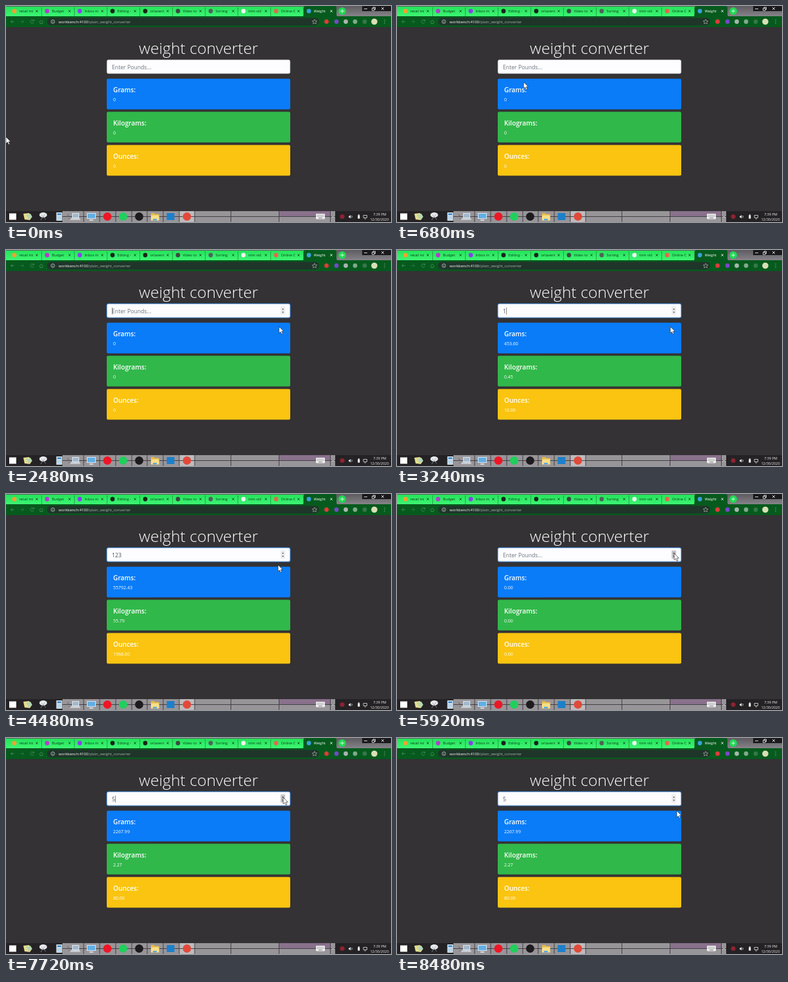
Recreate the animation shown at these times as an HTML page. Size 600 px wide and 338 px high, loop 8.52 s.

```html
<!DOCTYPE html>
<html lang="en">
<head>
<meta charset="utf-8">
<title>Weight converter</title>
<style>
html, body { margin: 0; width: 100%; height: 100%; overflow: hidden; background: #343234; }
svg { display: block; width: 100vw; height: 100vh; font-family: "Open Sans", "Noto Sans", sans-serif; }
text { white-space: pre; }
.title { font-size: 24.7px; font-weight: 300; fill: #fff; text-anchor: middle; }
.head { font-size: 10.2px; font-weight: 600; fill: #fff; }
.value { font-size: 7px; fill: #fff; }
.entry { font-size: 8.7px; fill: #495057; }
.tab { font-size: 5.7px; }
.url { font-size: 5.95px; fill: #a3b5a8; }
.clock { font-size: 5.5px; fill: #f2f2f2; text-anchor: middle; }
.line { fill: none; stroke-width: .8; }
</style>
</head>
<body>
<svg viewBox="0 0 600 338" preserveAspectRatio="none">
  <defs>
    <linearGradient id="frame" x2="0" y2="1">
      <stop offset="0" stop-color="#5d5b60"/><stop offset="1" stop-color="#858388"/>
    </linearGradient>
    <linearGradient id="strip" x2="0" y2="1">
      <stop offset="0" stop-color="#25e35a"/><stop offset="1" stop-color="#3df573"/>
    </linearGradient>
    <clipPath id="clipTab"><rect x="0" y="0" width="25" height="16"/></clipPath>
  </defs>
  <rect width="600" height="338" fill="#343234"/>

  <rect width="600" height="16" fill="url(#frame)"/>
  <rect y="1" width="464" height="15" fill="url(#strip)"/>
  <path d="M462 16q2 0 2-3V3q0-3 3-3h45q3 0 3 3v10q0 3 2 3z" fill="#075a1d"/>
  <g id="tabs"></g>
  <circle cx="524" cy="8" r="6" fill="#22d653"/>
  <path class="line" d="M521 8h6M524 5v6" stroke="#fff"/>
  <rect x="555" width="45" height="8" fill="#1a1a1c"/>
  <path class="line" d="M558 4.500h5M570.500 3.500h3.500v3.500h-3.500zM572 3.500v-1.500h3.500v3.500h-1.500M585 2l4 4M589 2l-4 4" stroke="#fff"/>

  <rect y="16" width="600" height="17" fill="#075a1d"/>
  <rect x="64" y="18.500" width="424" height="12" rx="6" fill="#20352a"/>
  <path class="line" d="M13 24.500H7.500m2.500-2.500l-2.500 2.500 2.500 2.500M43 23a2.700 2.700 0 1 0 .2 2.500M43.500 21v2.300h-2.300M52 25l3-3 3 3M53 24.500v3h4v-3" stroke="#4c8f60"/>
  <path class="line" d="M22 24.500h5.500m-2.500-2.500l2.500 2.500-2.500 2.500" stroke="#33774a"/>
  <circle class="line" cx="73" cy="24.500" r="2.800" stroke="#c5d0c8"/>
  <path class="line" d="M73 24v2M73 22.500v.700" stroke="#c5d0c8"/>
  <text class="url" x="82" y="26.500"><tspan fill="#fff">workbench:4100</tspan>/plain_weight_converter</text>
  <path d="M481 20.800l1.100 2.500 2.700.2-2 1.800.6 2.700-2.400-1.500-2.400 1.500.6-2.700-2-1.800 2.700-.2z" fill="none" stroke="#c5d0c8" stroke-width=".6"/>
  <g id="extras"></g>
  <path d="M589.300 21h1.400v1.400h-1.400zM589.300 23.800h1.400v1.400h-1.400zM589.300 26.600h1.400v1.400h-1.400z" fill="#4c8f60"/>

  <text class="title" x="300" y="75">weight converter</text>
  <rect id="glow" x="156.300" y="83.300" width="287.400" height="23.400" rx="3" fill="#1c5599"/>
  <rect id="box" x="157.300" y="84.300" width="285.400" height="21.400" rx="2.500" fill="#fdfcff" stroke-width=".6"/>
  <text class="entry" id="entry" x="165" y="98.600"></text>
  <rect id="caret" y="90" width=".7" height="11" fill="#555"/>
  <g id="spin">
    <rect id="spinBack" x="428" y="88.500" width="7" height="12.500"/>
    <path d="M430 93.300l1.500-1.800 1.500 1.800zM430 96.700l1.500 1.800 1.500-1.800z" fill="#3c3c3e"/>
  </g>
  <g id="cards"></g>

  <rect y="321" width="600" height="17" fill="#242225"/>
  <rect x="88" y="321" width="425" height="17" fill="#989599"/>
  <rect x="426" y="321" width="79" height="8" fill="#89718b"/>
  <rect x="270" y="321" width="24" height="17" fill="#bdbbbe"/>
  <path d="M88 329.500H513M121 321v17M146 321v17M171 321v17M196 321v17M220 321v17M245 321v17M270 321v17M294 321v17M350.500 321v17M425.500 321v17M505.500 321v17" stroke="#39363a" stroke-width=".9"/>
  <rect x="5" y="324.500" width="11" height="10" fill="#fff"/>
  <path d="M27 325l9-1 4 7-3 4-8-1z" fill="#e9dc8b"/><path d="M31 327l7-2 3 5-6 4z" fill="#b7d6b2"/>
  <ellipse cx="58" cy="327" rx="6" ry="4" fill="#e8e9ec"/><path class="line" d="M54 335l7-9M62 334l-7-7" stroke="#9aa3ad"/>
  <rect x="78.500" y="323" width="9" height="13" fill="#dcebf6"/><rect x="80" y="324.500" width="6" height="2.500" fill="#3786c8"/>
  <path d="M80 329h6M80 331.500h6M80 334h6" stroke="#5b91bb" stroke-dasharray="1.400 .9"/>
  <path d="M103 324h11v8h-11z" fill="#dfe7ef"/><path d="M104 325h9v6h-9z" fill="#a3b8ca"/><path d="M100 332h15l1 3h-17z" fill="#c5cbd1"/>
  <path d="M95 326l3 2-3 2M97 333h4" class="line" stroke="#5d5b60"/>
  <rect x="126" y="324" width="14" height="9" fill="#d5e8f7"/><rect x="127" y="325" width="12" height="7" fill="#62aee4"/><path d="M130 335h6" stroke="#e7edf2" stroke-width="1.500"/>
  <circle cx="158" cy="329.500" r="6.500" fill="#ee1626"/>
  <circle cx="182.500" cy="329.500" r="6.500" fill="#20cf5c"/>
  <circle cx="207.500" cy="329.500" r="6.500" fill="#1d1b1e"/>
  <path d="M226 324h5l1 1.500h6.500v10H226z" fill="#e8b947"/><path d="M226 327.500h12.500v8H226z" fill="#f9df87"/><path d="M229 333h6v2.500h-6z" fill="#5aa6dc"/>
  <rect x="250.500" y="324" width="12" height="11" fill="#1c80ca"/>
  <circle cx="282" cy="329.500" r="6.500" fill="#e04a3a"/>
  <rect x="483" y="325" width="14" height="8.500" rx="1" fill="#f0f0f1"/>
  <path d="M484.500 327.200h11M484.500 329.400h11" stroke="#777" stroke-dasharray="1.200 .8"/><path d="M487 331.800h6" stroke="#777"/>
  <path class="line" d="M507.500 331l2-2 2 2" stroke="#fff"/>
  <circle cx="524" cy="329.500" r="3.600" fill="#8d2330"/>
  <path d="M534 328.700h1.300l1.700-1.700v5.500l-1.700-1.700h-1.300z" fill="#fff"/><path class="line" d="M538.500 328q1.500 1.700 0 3.500" stroke="#fff"/>
  <rect x="548.300" y="327.300" width="3" height="5.400" fill="#fff"/><path d="M549.100 326.500h1.400" stroke="#fff"/>
  <path class="line" d="M557 327.500h5.500v3.800h-5.500zM558.500 333h2.500" stroke="#e6e6e6"/>
  <text class="clock" x="582.500" y="328">7:39 PM</text>
  <text class="clock" x="582" y="336.300">12/30/2020</text>

  <path id="arrow" d="M0 0V10.200L2.400 8 4.100 11.900 5.900 11.100 4.200 7.300H7.300Z" fill="#fff" stroke="#161616" stroke-width=".6"/>
</svg>
<script>
const $ = id => document.getElementById(id);
const LOOP = 8520, BLINK = 500;

const tabs = [
  ["retail mi", "#f2a32c"], ["Budget", "#b33ccf"], ["Inbox m", "#8a3ff0"], ["Editing -", "#17251b"],
  ["orlavent", "#17251b"], ["Video to", "#3a4a3f"], ["Sorting", "#50635a"], ["trim vid", "#f3f3f3"],
  ["Online C", "#e8664c"], ["Weight", "#3a9fd8"]
];
$("tabs").innerHTML = tabs.map(([name, color], i) => {
  const active = i === tabs.length - 1;
  const ink = active ? "#fff" : "#0b3a19";
  const edge = active ? "" : '<path d="M55.500 2v14" stroke="#1a8a3c" stroke-width=".7"/>';
  return `<g transform="translate(${51 * i})"><circle cx="13" cy="8" r="3.400" fill="${color}"/>
    <g transform="translate(20.500)" clip-path="url(#clipTab)"><text class="tab" y="10.200" fill="${ink}">${name}</text></g>
    <path class="line" d="M46.300 6.300l3.400 3.400M49.700 6.300l-3.400 3.400" stroke="${ink}"/>${edge}</g>`;
}).join("");

const extras = [[499.5, "#e03a3c"], [515, "#7448c8"], [529.5, "#a9b5ac"], [544, "#7fa98b"], [559, "#33774a"], [574, "#d9dfb4"]];
$("extras").innerHTML = extras.map(([x, color], i) =>
  `<circle cx="${x}" cy="24.500" r="${i === 5 ? 4.8 : 3.4}" fill="${color}"/>`).join("");

const cards = [
  ["Grams:", "#0a7cf8", lb => lb / 0.0022046],
  ["Kilograms:", "#31b84a", lb => lb / 2.2046],
  ["Ounces:", "#fac410", lb => lb * 16]
];
$("cards").innerHTML = cards.map(([name, color], i) =>
  `<g transform="translate(157 ${113.7 + 51.9 * i})"><rect width="286" height="48" rx="2" fill="${color}"/>
   <text class="head" x="10" y="21.600">${name}</text><text class="value" x="10" y="35.300"></text></g>`).join("");
const values = [...document.querySelectorAll(".value")];

// [time, entry]; null means untouched and unfocused
const entries = [
  [0, null], [1000, ""], [2900, "1"], [3520, "12"], [3960, "123"],
  [5040, "12"], [5220, "1"], [5400, ""],
  [6440, "1"], [6760, "2"], [7080, "3"], [7360, "4"], [7640, "5"]
];

// [time, x, y] of the pointer tip
const path = [
  [0, 0, 205], [160, 0, 205], [900, 250, 96], [1900, 250, 96], [2500, 426, 120],
  [3700, 426, 120], [4100, 424, 111], [5300, 424, 111], [5720, 432, 93],
  [7840, 432, 93], [8200, 436, 114], [LOOP, 436, 114]
];

const ease = u => u * u * (3 - 2 * u);
const show = (id, on) => $(id).setAttribute("visibility", on ? "visible" : "hidden");

function pointer(t) {
  const i = path.findIndex(p => p[0] > t);
  const [t0, x0, y0] = path[i - 1], [t1, x1, y1] = path[i];
  const u = ease((t - t0) / (t1 - t0));
  return [x0 + (x1 - x0) * u, y0 + (y1 - y0) * u];
}

function draw(t) {
  const [since, entry] = entries.filter(e => e[0] <= t).pop();
  const focused = entry !== null, text = entry || "";
  const [x, y] = pointer(t);
  const inBox = x > 157 && x < 443 && y > 84 && y < 106;
  const onSpin = inBox && x > 427;

  $("entry").textContent = text || "Enter Pounds...";
  $("entry").style.fill = text ? "#495057" : "#6c757d";
  $("box").setAttribute("stroke", focused ? "#6fa3da" : "#ced4da");
  $("caret").setAttribute("x", 165.2 + text.length * 4.98);
  show("caret", focused && (t - since) % (2 * BLINK) < BLINK);
  show("glow", focused);
  show("spin", focused || inBox);
  $("spinBack").setAttribute("fill", onSpin ? "#c4c4c6" : "#ececef");
  cards.forEach(([, , convert], i) => {
    values[i].textContent = t < entries[2][0] ? "0" : convert(Number(text)).toFixed(2);
  });

  $("arrow").setAttribute("transform", `translate(${x} ${y})`);
  show("arrow", !inBox || onSpin);
}

const start = performance.now();
function tick() {
  draw((performance.now() - start) % LOOP);
  requestAnimationFrame(tick);
}
tick();
</script>
</body>
</html>
```
